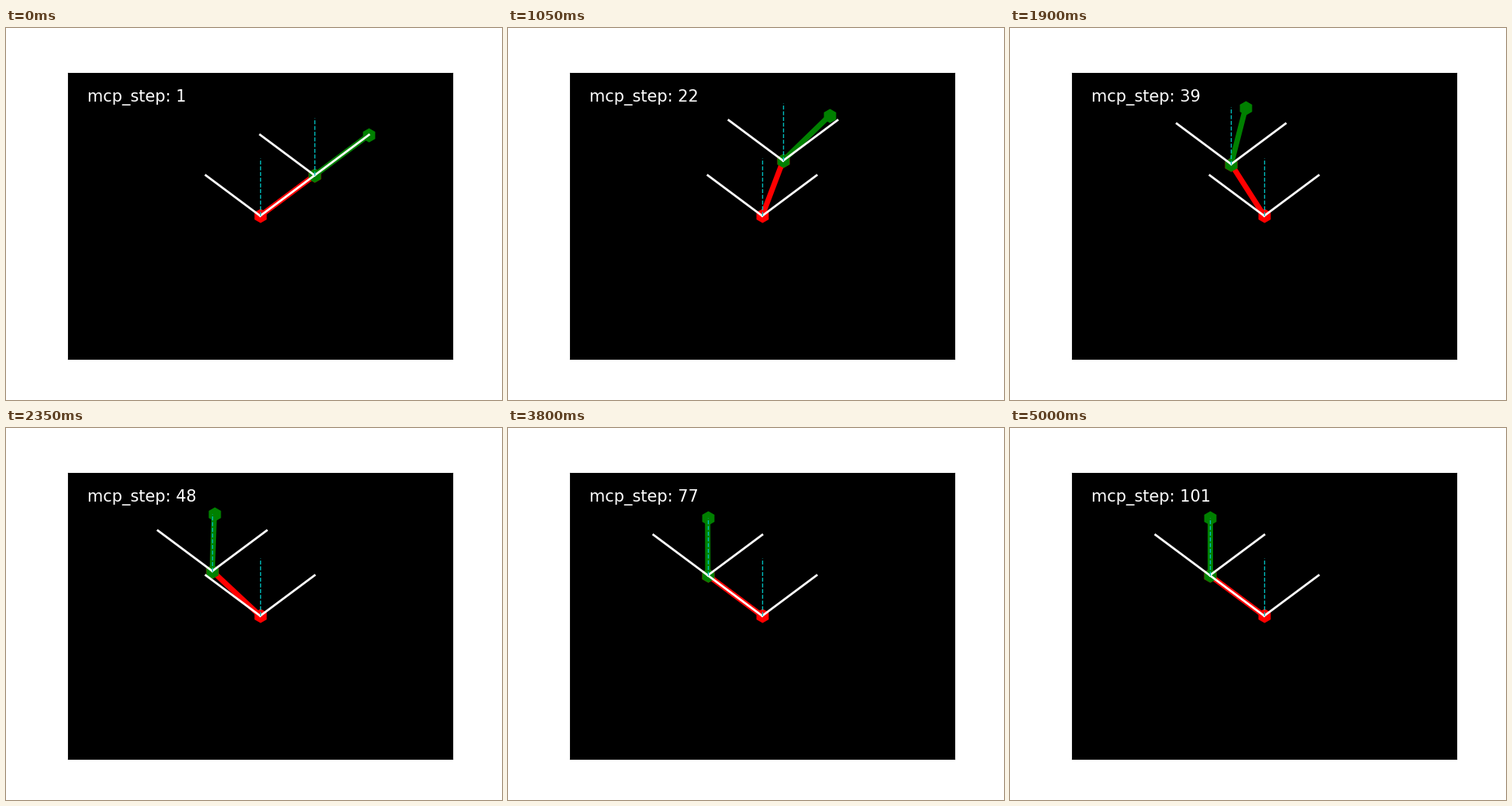
Recreate the animation shown at these times as a matplotlib script. Size 640 by 480 pixels, loop 5.05 s.

```python
import numpy as np
import matplotlib.pyplot as plt
from matplotlib.animation import FuncAnimation

FRAMES = 101
KEY_STEP = 11  # frames between key angles
LOW, MID, HIGH = 45, 90, 135

LOWER_KEYS = [LOW, 56.7, 76.4, 105.3, 125, 134.5, HIGH]
UPPER_KEYS = [LOW, 45.9, 53.6, 72.2, 86, 92.8, 92.2, MID]


def swing(keys, n):
    """Catmull-Rom curve through evenly spaced keys, kept within the limits."""
    i, rest = divmod(n, KEY_STEP)
    u = rest / KEY_STEP
    a, b, c, d = (keys[min(max(i + k, 0), len(keys) - 1)] for k in (-1, 0, 1, 2))
    angle = b + u / 2 * (c - a + u * (2 * a - 5 * b + 4 * c - d
                                      + u * (3 * (b - c) + d - a)))
    return min(max(angle, LOW), HIGH)


fig = plt.figure(figsize=(6.4, 4.8), dpi=100)
ax = fig.add_subplot(facecolor="black")
ax.set(xlim=(-2.5, 2.5), ylim=(-2.5, 2.5), xticks=[], yticks=[])


def link(color):
    return ax.plot([], [], color=color, lw=5, marker="h", ms=12)[0]


def guides():
    limits = [ax.plot([], [], "w-", lw=2)[0] for _ in range(2)]
    return limits + ax.plot([], [], "c--", lw=1)


def place(line, start, degrees):
    """Lay a unit-length line from start and return its far end."""
    angle = np.radians(degrees)
    end = start + np.array([np.cos(angle), np.sin(angle)])
    line.set_data(*zip(start, end))
    return end


red, green = link("r"), link("g")
base_guides, joint_guides = guides(), guides()
label = ax.text(0.05, 0.9, "", color="white", fontsize=15,
                fontfamily="DejaVu Sans", transform=ax.transAxes)


def update(n):
    base = np.zeros(2)
    joint = place(red, base, swing(LOWER_KEYS, n))
    place(green, joint, swing(UPPER_KEYS, n))
    for start, group in ((base, base_guides), (joint, joint_guides)):
        for line, degrees in zip(group, (LOW, HIGH, MID)):
            place(line, start, degrees)
    label.set_text(f"mcp_step: {n + 1}")
    return [red, green, *base_guides, *joint_guides, label]


anim = FuncAnimation(fig, update, frames=FRAMES, interval=50,
                     init_func=lambda: update(0), repeat=True, repeat_delay=0)
plt.show()
```
